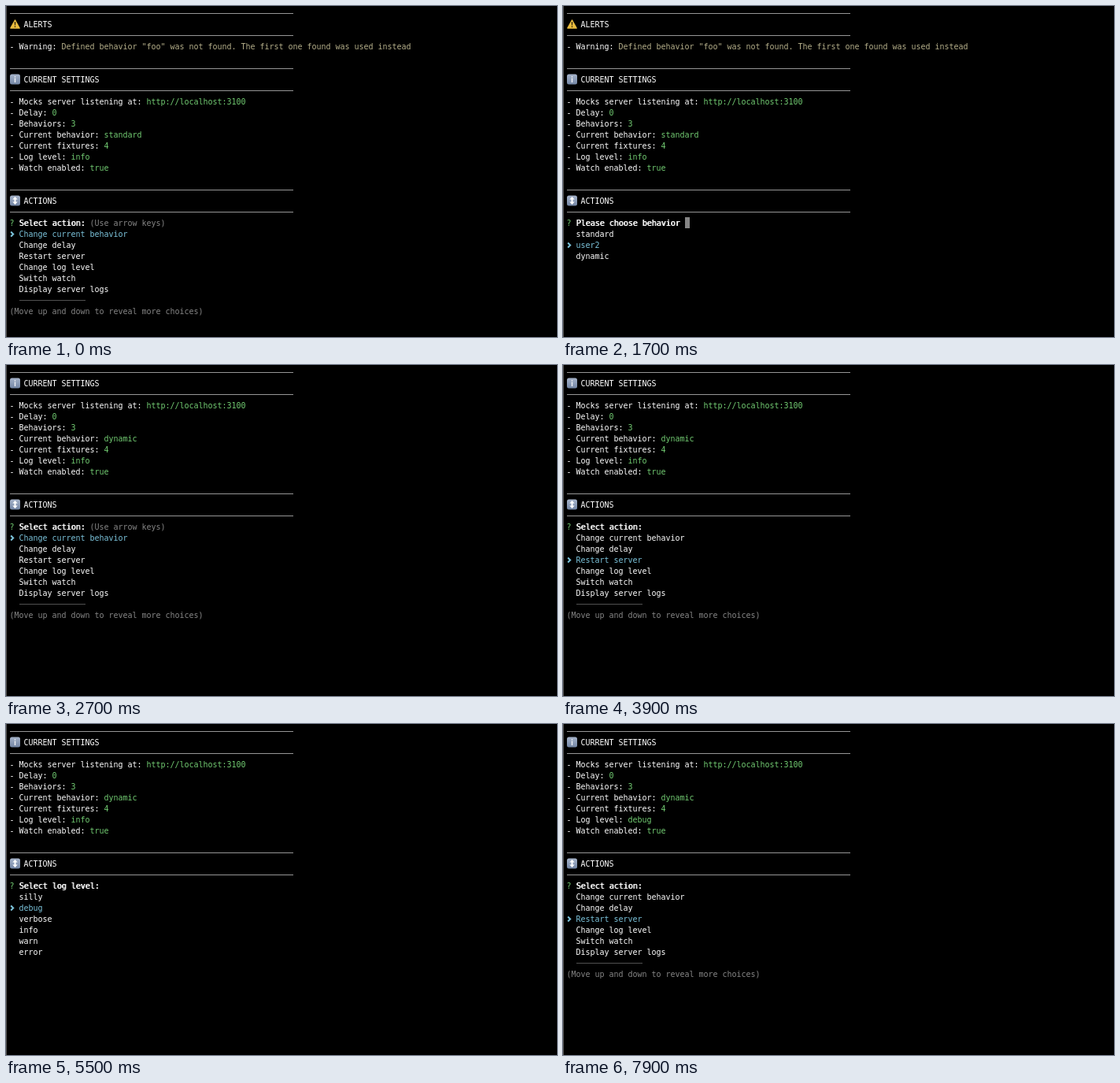
An HTML page with a canvas for the animation above (8 s loop, 700 px wide and 420 px high).

```html
<!DOCTYPE html>
<html lang="en">
<head>
<meta charset="utf-8">
<title>Terminal menu</title>
<style>
html, body { margin: 0; width: 100%; height: 100%; overflow: hidden; background: #000; }
canvas { display: block; }
</style>
</head>
<body>
<canvas id="stage" width="700" height="420"></canvas>
<script>
const ctx = document.getElementById('stage').getContext('2d');
const LOOP = 8000, CELL = 6, LINE = 14, LEFT = 5;
const WHITE = '#fff', GREEN = '#72cc72', CYAN = '#7cc4dc', YELLOW = '#b5af8a', GRAY = '#868686', RULE = '#969696';

const ACTIONS = ['Change current behavior', 'Change delay', 'Restart server',
  'Change log level', 'Switch watch', 'Display server logs'];
const BEHAVIORS = ['standard', 'user2', 'dynamic'];
const LEVELS = ['silly', 'debug', 'verbose', 'info', 'warn', 'error'];

const menu = (at, selected, hint) =>
  ({ at, ask: 'Select action:', list: ACTIONS, selected, hint, paged: true });
const behavior = (at, selected, hint) =>
  ({ at, ask: 'Please choose behavior', list: BEHAVIORS, selected, hint, typing: true });
const level = (at, selected, hint) =>
  ({ at, ask: 'Select log level:', list: LEVELS, selected, hint });
const answered = (at, ask, answer) => ({ at, ask, answer });
const KEYS = '(Use arrow keys)';

const prompts = [
  menu(0, 0, KEYS),
  answered(500, 'Select action:', ACTIONS[0]),
  behavior(600, 0, '(Use arrow keys or type to search)'),
  behavior(1500, 1),
  behavior(2000, 2),
  answered(2500, 'Please choose behavior', BEHAVIORS[2]),
  menu(2600, 0, KEYS),
  menu(3600, 1),
  menu(3900, 2),
  menu(4100, 3),
  answered(4700, 'Select action:', ACTIONS[3]),
  level(4800, 0, KEYS),
  level(5500, 1),
  level(5800, 2),
  level(6400, 1),
  menu(6900, 0, KEYS),
  menu(7500, 1),
  menu(7800, 2)
];

const colX = col => LEFT + col * CELL;
const rowY = row => 9 + row * LINE;

// Bold is the regular face struck twice, as terminals do.
function text(row, col, str, color = WHITE, bold = false) {
  ctx.font = '10px "DejaVu Sans Mono", monospace';
  ctx.letterSpacing = '-0.02px';
  ctx.fillStyle = color;
  const x = colX(col) - 0.6, y = rowY(row) + 4;
  ctx.fillText(str, x, y);
  if (bold) ctx.fillText(str, x + 0.8, y);
}

function rule(row, col = 0, count = 60, color = RULE) {
  ctx.fillStyle = color;
  ctx.fillRect(colX(col), rowY(row), count * CELL, 1);
}

function cursor(row, col) {
  ctx.fillStyle = '#858585';
  ctx.fillRect(colX(col), rowY(row) - 7, CELL, LINE);
}

function pointer(row) {
  const y = rowY(row) + 0.5;
  ctx.strokeStyle = CYAN;
  ctx.lineWidth = 2;
  ctx.stroke(new Path2D(`M6.2 ${y - 3}L9.2 ${y}L6.2 ${y + 3}`));
}

function shape(path, color) {
  ctx.fillStyle = color;
  ctx.fill(new Path2D(path));
}

const icons = {
  warning() {
    ctx.lineJoin = 'round';
    ctx.lineWidth = 1.5;
    ctx.strokeStyle = '#e9bc3f';
    const triangle = 'M0 -5L5.6 5H-5.6Z';
    shape(triangle, '#e9bc3f');
    ctx.stroke(new Path2D(triangle));
    shape('M-.9 -2.8H.9L.5 1.6H-.5ZM-.7 2.6H.7V4H-.7Z', '#302610');
  },
  tile() {
    const fade = ctx.createLinearGradient(0, -6, 0, 7);
    fade.addColorStop(0, '#a3b1c8');
    fade.addColorStop(1, '#7285a4');
    ctx.fillStyle = fade;
    ctx.beginPath();
    ctx.roundRect(-6.5, -6.5, 13, 13, 2.5);
    ctx.fill();
  },
  info() {
    icons.tile();
    shape('M-.7 -4H.7V-2.6H-.7ZM-.7 -1.4H.7V4H-.7Z', '#eef1f6');
  },
  arrows() {
    icons.tile();
    shape('M0 -5L3.2 -1.5H1V1.5H3.2L0 5L-3.2 1.5H-1V-1.5H-3.2Z', '#fff');
  }
};

function heading(row, icon, title) {
  rule(row);
  ctx.save();
  ctx.translate(11.5, rowY(row + 1));
  icons[icon]();
  ctx.restore();
  text(row + 1, 3, title);
  rule(row + 2);
}

function item(row, label, value, color = GREEN) {
  text(row, 0, `- ${label}:`);
  text(row, label.length + 4, value, color);
}

function drawPrompt(row, { ask, answer, list, selected, hint = '', typing, paged }) {
  text(row, 0, '?', GREEN);
  text(row, 2, ask, WHITE, true);
  const end = ask.length + 3;
  if (answer) {
    text(row, end, answer, CYAN);
    cursor(row + 1, 0);
    return;
  }
  text(row, end, hint, GRAY);
  if (typing) cursor(row, end + hint.length);
  list.forEach((name, i) => {
    const y = row + 1 + i;
    if (i === selected) pointer(y);
    text(y, 2, name, i === selected ? CYAN : WHITE);
  });
  if (paged) {
    rule(row + 7, 2, 14, '#505050');
    text(row + 8, 0, '(Move up and down to reveal more choices)', GRAY);
  }
}

function draw(t) {
  ctx.fillStyle = '#000';
  ctx.fillRect(0, 0, 700, 420);
  ctx.fillStyle = '#555';
  ctx.fillRect(0, 0, 1, 420);

  const alerting = t < 2600;
  let row = 0;
  if (alerting) {
    heading(0, 'warning', 'ALERTS');
    item(3, 'Warning', 'Defined behavior "foo" was not found. The first one found was used instead', YELLOW);
    row = 5;
  }
  heading(row, 'info', 'CURRENT SETTINGS');
  const settings = [
    ['Mocks server listening at', 'http://localhost:3100'],
    ['Delay', '0'],
    ['Behaviors', '3'],
    ['Current behavior', alerting ? 'standard' : 'dynamic'],
    ['Current fixtures', '4'],
    ['Log level', t < 6900 ? 'info' : 'debug'],
    ['Watch enabled', 'true']
  ];
  settings.forEach(([label, value], i) => item(row + 3 + i, label, value));
  heading(row + 11, 'arrows', 'ACTIONS');
  drawPrompt(row + 14, prompts.findLast(p => p.at <= t));
}

const start = performance.now();
function tick() {
  draw((performance.now() - start) % LOOP);
  requestAnimationFrame(tick);
}
tick();
</script>
</body>
</html>
```
